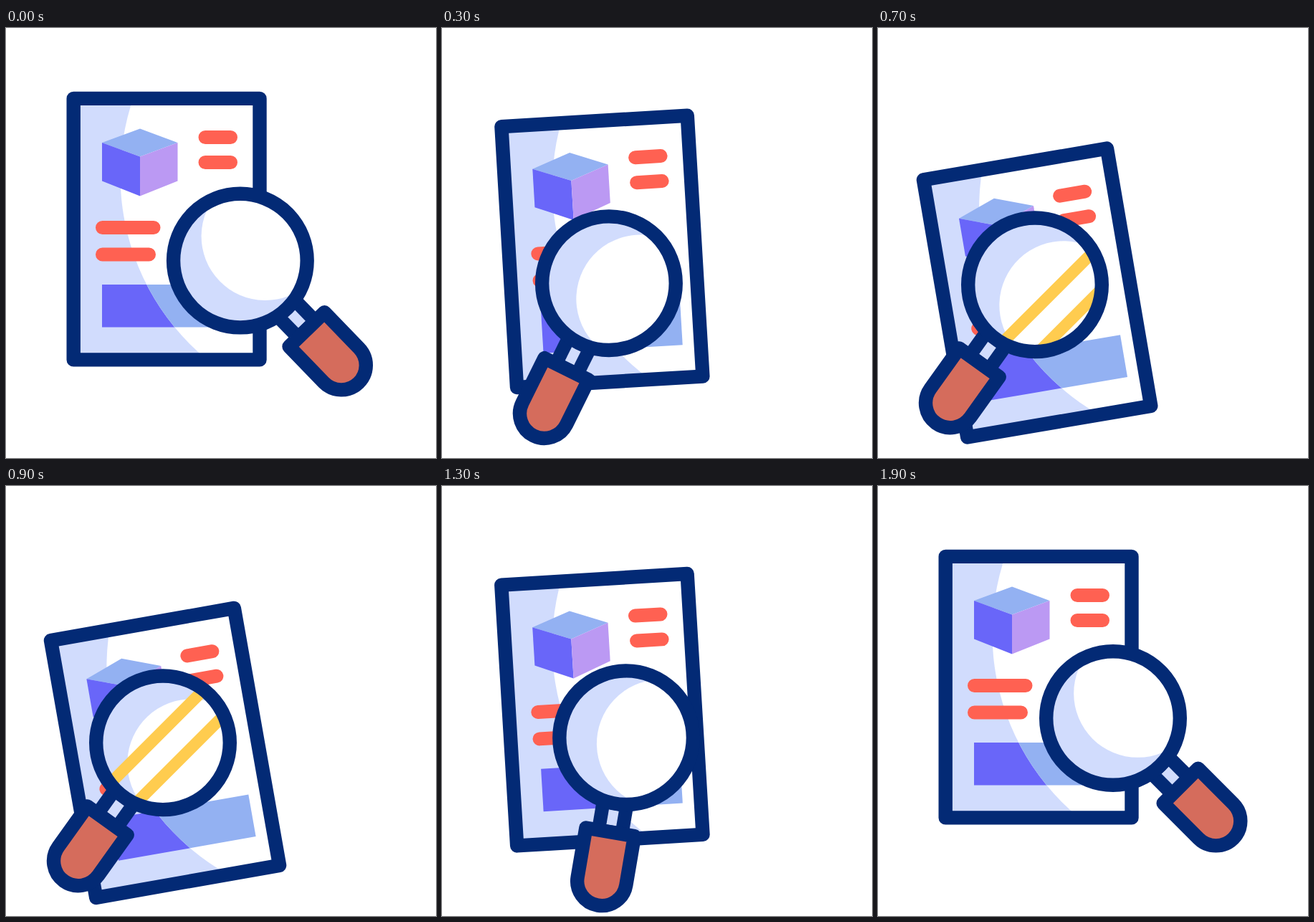
Animation of 600x600 px, one loop 2200 ms. Source, as an HTML page:

```html
<!DOCTYPE html>
<html lang="en">
<head>
<meta charset="utf-8">
<title>Document inspection</title>
<style>
  html, body { margin: 0; width: 100%; height: 100%; overflow: hidden; background: #fff; }
  svg { display: block; width: 100%; height: 100%; }
  .pill { stroke: #ff6152; stroke-width: 19; stroke-linecap: round; }
  .outline { fill: none; stroke: #032a75; stroke-width: 19.4; stroke-linejoin: round; }
</style>
</head>
<body>
<svg viewBox="0 0 600 600">
  <defs>
    <clipPath id="lit"><circle cx="492.5" cy="206" r="333"/></clipPath>
    <clipPath id="lens"><circle r="88"/></clipPath>
  </defs>

  <g id="page">
    <rect x="94" y="98.5" width="260" height="364" fill="#d1dcfd"/>
    <rect x="134" y="358" width="194.5" height="59.5" fill="#6966f9"/>
    <g clip-path="url(#lit)">
      <rect x="94" y="98.5" width="260" height="364" fill="#fff"/>
      <rect x="134" y="358" width="194.5" height="59.5" fill="#93b1f2"/>
    </g>
    <path d="M187 140.5L239.5 160L187 179.5L134 160Z" fill="#93b1f2"/>
    <path d="M134 160L187 179.5V234.5L134 213.5Z" fill="#6966f9"/>
    <path d="M239.5 160L187 179.5V234.5L239.5 213.5Z" fill="#bb99f3"/>
    <path class="pill" d="M278 152.5H313.5M278 187.5H313.5M134.5 278.5H206M134.5 316H199.5"/>
    <rect class="outline" x="94.2" y="98.4" width="259.8" height="364.5"/>
  </g>

  <g id="glass">
    <g id="tilt">
      <rect x="90" y="-26" width="44" height="52" fill="#032a75"/>
      <rect x="102.5" y="-7" width="21.5" height="14" fill="#d1dcfd"/>
      <path class="outline" style="fill:#d56c5c" d="M133.5 -34.3H203A34.3 34.3 0 0 1 203 34.3H133.5Z"/>
      <circle r="88" fill="#d1dcfd"/>
      <g clip-path="url(#lens)"><circle cy="-49" r="89.5" fill="#fff"/></g>
    </g>
    <g clip-path="url(#lens)">
      <path id="glint" d="M0 -120V120M45 -120V120" stroke="#ffcc4f" stroke-width="16.3"/>
    </g>
    <circle class="outline" r="93.3"/>
  </g>
</svg>
<script>
const LOOP = 2200, STEP = 100, REST = 1900;
const [page, glass, tilt, glint] =
  ['page', 'glass', 'tilt', 'glint'].map(id => document.getElementById(id));

const clamp = x => Math.min(1, Math.max(0, x));
const bezier = (a, b, u) => 3 * a * u * (1 - u) ** 2 + 3 * b * u * u * (1 - u) + u ** 3;

// Same curve as the CSS "ease" keyword.
function ease(x) {
  let lo = 0, hi = 1;
  for (let i = 0; i < 24; i++) {
    const mid = (lo + hi) / 2;
    if (bezier(.25, .25, mid) < x) lo = mid; else hi = mid;
  }
  return bezier(.1, 1, lo);
}

const ramp = (t, start, length) => {
  const x = clamp((t - start) / length);
  return x === 0 || x === 1 ? x : ease(x);
};
const thereAndBack = (t, out, back, length) => ramp(t, out, length) - ramp(t, back, length);

// [time, offset across the lens]
const sweep = [[500, 105], [700, 25], [1100, -49], [1250, -150]];
function sweepAt(t) {
  let offset = sweep[0][1];
  for (let i = 1; i < sweep.length; i++) {
    const [t0, a] = sweep[i - 1], [t1, b] = sweep[i];
    offset += (b - a) * clamp((t - t0) / (t1 - t0));
  }
  return offset;
}

function draw(now) {
  const t = Math.min(REST, Math.floor(now % LOOP / STEP) * STEP);

  const p = thereAndBack(t, 142, 1025, 720);
  page.setAttribute('transform',
    `translate(${-2 * p} ${91.8 * p}) rotate(${-10 * p} 224 281)`);

  const q = thereAndBack(t, -12, 1190, 520);
  const bow = q * (1 - q);
  glass.setAttribute('transform',
    `translate(${328 - 109 * q + 14 * bow} ${324 + 34.3 * q + 18 * bow})`);
  tilt.setAttribute('transform', `rotate(${45 + 80.6 * q})`);
  glint.setAttribute('transform', `rotate(45) translate(${sweepAt(t)})`);
}

const begin = performance.now();
function tick() {
  draw(performance.now() - begin);
  requestAnimationFrame(tick);
}
tick();
</script>
</body>
</html>
```
